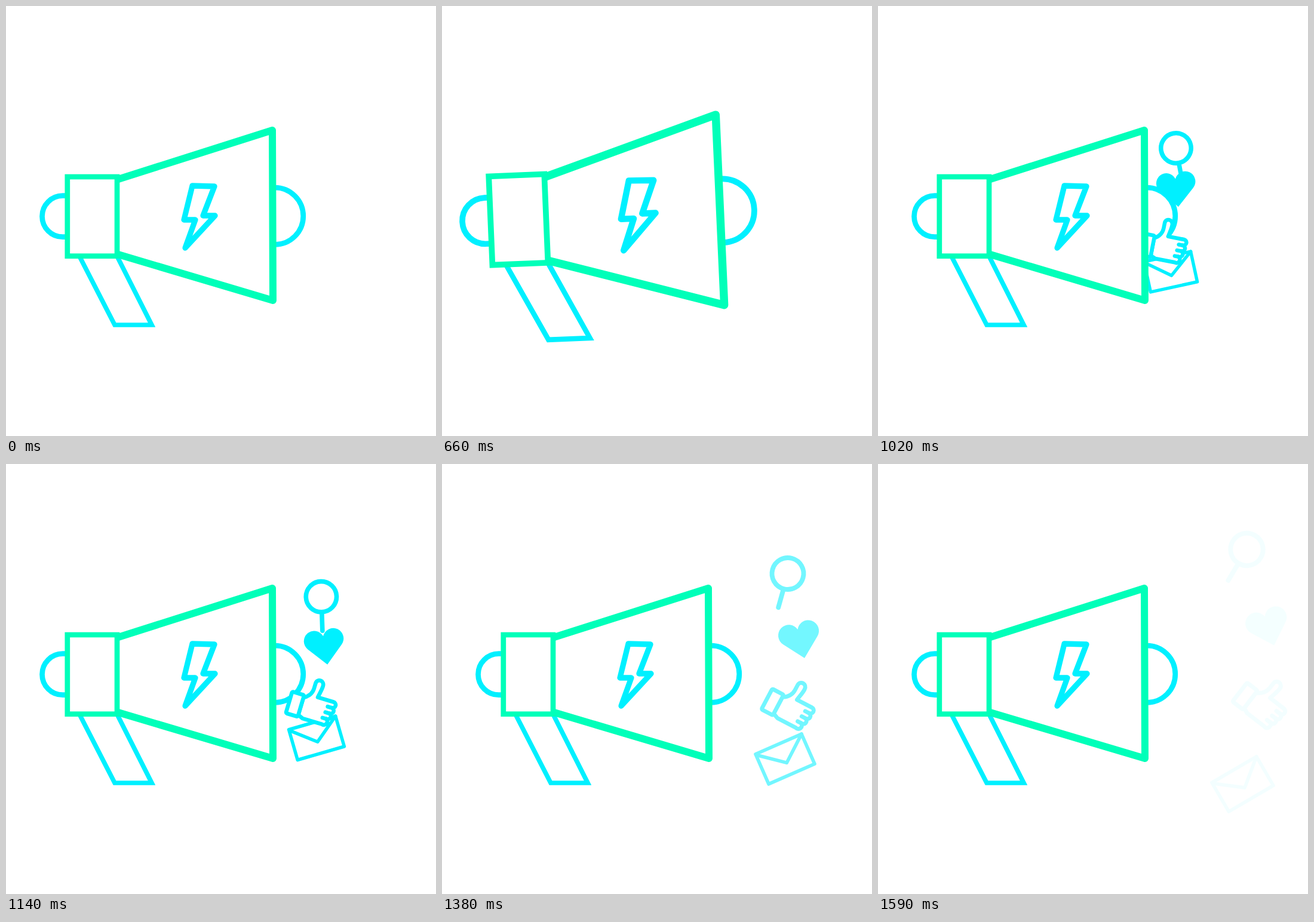
Animation of 720x720 px, one loop 2.46 s. Source, as an HTML page:

```html
<!DOCTYPE html>
<html lang="en">
<head>
<meta charset="utf-8">
<title>Megaphone</title>
<style>
  html, body { margin: 0; width: 100%; height: 100%; overflow: hidden; background: #fff; }
  svg { display: block; width: 100%; height: 100%; }
  .cyan { stroke: #00f0ff; }
  .green { stroke: #00ffb9; }
  .round { stroke-linecap: round; stroke-linejoin: round; }
</style>
</head>
<body>
<svg viewBox="0 0 720 720" fill="none">
  <g class="horn cyan" stroke-width="8.7">
    <path d="M103 317.7H95A34.5 34.5 0 0 0 95 386.7H103"/>
    <path d="M446 304H450A47.7 47.7 0 0 1 450 399.5H446"/>
    <path d="M124 421L182 534H244L187 421" stroke-width="7.7"/>
  </g>

  <g id="icons" class="cyan round">
    <g id="lens" stroke-width="7.5">
      <circle r="25.2"/>
      <path d="M0 27V56"/>
    </g>
    <path id="heart" fill="#00f0ff" stroke="none"
      d="M0 28L-28 -1A17 17 0 1 1 0 -19A17 17 0 1 1 28 -1Z" style="stroke:none"/>
    <g id="mail" stroke-width="5.5">
      <rect x="-40" y="-26" width="80" height="52"/>
      <path d="M-39 -24L0 6.5L40 -26"/>
    </g>
    <g id="thumb" stroke-width="6.5" fill="#fff">
      <path d="M-16.5 -6C-8 -10 -4 -18 -4 -25V-34C-4 -43 9 -43 9 -33C9 -26 7 -20 6 -13H33A5 5 0 0 1 33 -3A5 5 0 0 1 32 7A5 5 0 0 1 29 17A5 5 0 0 1 25 27.5H-8L-16.5 24Z"/>
      <path d="M35 -3H26M33 7H25M30 17H23"/>
      <rect x="-37" y="-10" width="20.5" height="37" rx="2"/>
    </g>
  </g>

  <g class="horn">
    <path class="green round" fill="#fff" stroke-width="12" d="M188 290L446 208L447 493L188 416"/>
    <rect class="green" fill="#fff" x="102.8" y="286" width="83.2" height="132.7" stroke-width="8.7"/>
    <path class="cyan round" stroke-width="9.3" d="M312 301L349 302L330 351H350L300 405L317 358H298Z"/>
  </g>
</svg>
<script>
const LOOP = 2460, STEP = 30;
const clamp = (v, lo = 0, hi = 1) => Math.min(hi, Math.max(lo, v));
const byId = id => document.getElementById(id);
const horns = document.querySelectorAll('.horn');
const icons = byId('icons');

// Four points on each flight path, reached at these steps
const KEYS = [0, 8, 12, 19];
const flights = [
  { el: byId('lens'), x: [499, 554.5, 579, 617.5], y: [238, 204, 183.5, 143], angle: -10.7, spin: 2.19 },
  { el: byId('heart'), x: [500, 567.5, 600.2, 654], y: [308.3, 303.6, 296.4, 275], angle: -6, spin: -.62 },
  { el: byId('mail'), x: [490, 548.5, 574.5, 610.5], y: [445, 475, 494, 536], angle: -12.3, spin: -.95 },
  { el: byId('thumb'), x: [477.5, 547.5, 582.5, 643], y: [397.5, 403.7, 403.8, 399], angle: 11, spin: 1.4 }
];

// Smooth curve through the four points
const curve = (values, t) => values.reduce((sum, v, i) =>
  sum + KEYS.reduce((p, k, j) => j === i ? p : p * (t - k) / (KEYS[i] - k), v), 0);

function poseHorn(time) {
  const n = (time - 450) / STEP;
  const p = n < 1 || n > 18 ? 0 : n < 9 ? (n + .65) / 9.65 : (18 - n) / 9;
  const move = `translate(281 362) rotate(${-3 * p}) scale(${1 + .15 * p}) translate(-281 -362)`;
  horns.forEach(h => h.setAttribute('transform', move));
}

function poseIcons(time) {
  const n = (time - 1020) / STEP;
  icons.style.display = n < 0 ? 'none' : '';
  if (n < 0) return;
  const t = Math.min(n, 19);
  const f = clamp((t - 5.3) / 14);
  const fade = 1 - .96 * f * f * (3 - 2 * f);
  for (const { el, x, y, angle, spin } of flights) {
    el.setAttribute('transform',
      `translate(${curve(x, t)} ${curve(y, t)}) rotate(${angle + spin * t}) scale(${1 + .0042 * t})`);
    el.setAttribute('opacity', fade);
  }
}

function draw(now) {
  const time = Math.floor(now % LOOP / STEP) * STEP;
  poseHorn(time);
  poseIcons(time);
}

let start;
function tick(now) {
  start ??= now;
  draw(now - start);
  requestAnimationFrame(tick);
}
draw(0);
requestAnimationFrame(tick);
</script>
</body>
</html>
```
